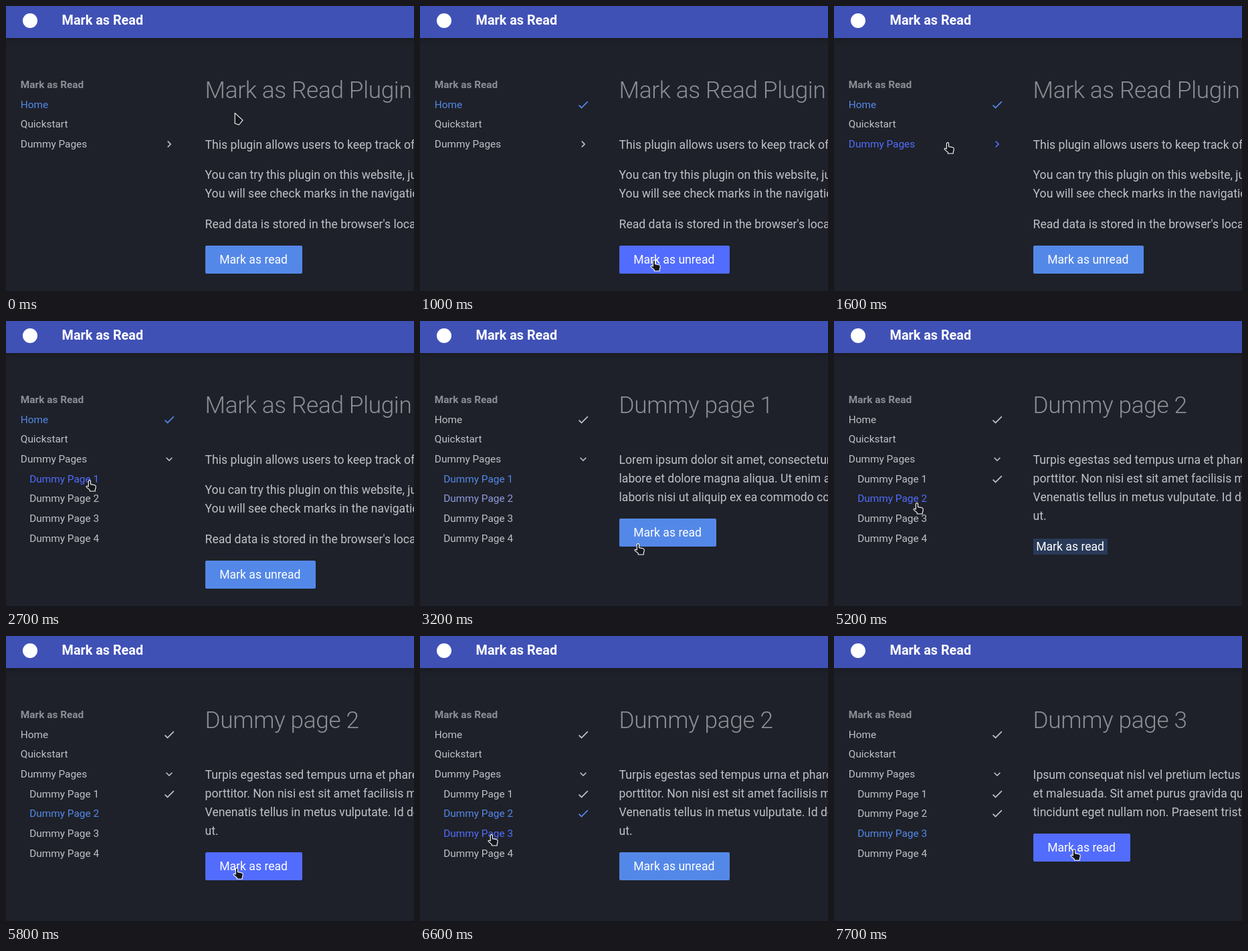
An HTML page that plays this animation: 610x430 px, repeating every 8 s.

```html
<!DOCTYPE html>
<html lang="en">
<head>
<meta charset="utf-8">
<title>Mark as Read</title>
<style>
html, body { margin: 0; width: 100%; height: 100%; overflow: hidden; background: #1e2129; }
#stage { position: relative; width: 610px; height: 430px; overflow: hidden; }
header { position: absolute; width: 610px; height: 48.4px; background: #4051b5;
  box-shadow: 0 0 4.4px #0000001a, 0 4.4px 8.8px #0003; }
svg { position: absolute; left: 0; top: 0; display: block; }
text { font-family: Roboto, "Liberation Sans", sans-serif; white-space: pre; }
.brand { font-size: 19.8px; font-weight: 700; fill: #fff; }
.nav { font-size: 15.4px; }
.title { font-weight: 700; fill: #8c8e95; }
.h1 { font-size: 35.2px; font-weight: 300; letter-spacing: -.01em; fill: #8c8e95; }
.body, .label { font-size: 17.6px; fill: #bfc1c6; }
.label { fill: #fff; }
.cursor path { fill: #15171c; stroke: #fff; stroke-width: 1.1; stroke-linejoin: round; }
</style>
</head>
<body>
<div id="stage">
<header></header>
<svg id="art" width="610" height="430" viewBox="0 0 610 430"></svg>
</div>
<script>
const LOOP = 8000, STEP = 100, FADE = 100;
const FG = [191, 193, 198], LINK = [84, 136, 232], ACCENT = [82, 108, 254];
const CONTENT_X = 297.6;

const pages = [
  { from: 0, row: 0, title: 'Mark as Read Plugin', button: 359, marked: 1000, lines: [
    [214, 'This plugin allows users to keep track of pages'],
    [259, 'You can try this plugin on this website, just'],
    [287, 'You will see check marks in the navigation'],
    [333, "Read data is stored in the browser's local storage"]] },
  { from: 3000, row: 3, title: 'Dummy page 1', button: 296, marked: 3800, lines: [
    [214, 'Lorem ipsum dolor sit amet, consectetur'],
    [242, 'labore et dolore magna aliqua. Ut enim ad'],
    [270, 'laboris nisi ut aliquip ex ea commodo consequat']] },
  { from: 5200, row: 4, title: 'Dummy page 2', button: 324, marked: 6000, plainUntil: 5300, lines: [
    [214, 'Turpis egestas sed tempus urna et pharetra'],
    [242, 'porttitor. Non nisi est sit amet facilisis magna'],
    [270, 'Venenatis tellus in metus vulputate. Id dolor'],
    [298, 'ut.']] },
  { from: 7000, row: 5, title: 'Dummy page 3', button: 296, marked: Infinity, lines: [
    [214, 'Ipsum consequat nisl vel pretium lectus'],
    [242, 'et malesuada. Sit amet purus gravida quis'],
    [270, 'tincidunt eget nullam non. Praesent tristique']] }
];

// Hover spans per navigation row: [enter, leave]
const rows = [
  { name: 'Home', y: 148, hover: [] },
  { name: 'Quickstart', y: 177, hover: [] },
  { name: 'Dummy Pages', y: 207, hover: [[1500, 2600]] },
  { name: 'Dummy Page 1', y: 237, hover: [[2400, 3050]] },
  { name: 'Dummy Page 2', y: 266, hover: [[3040, 3145], [4500, 5300]] },
  { name: 'Dummy Page 3', y: 296, hover: [[6500, 7150]] },
  { name: 'Dummy Page 4', y: 326, hover: [] }
];
const buttonHover = [[500, 1100], [3300, 3900], [5700, 6100], [7550, 9000]];

// Pointer stops: time, x, y
const stops = [
  [0, 342, 160], [100, 342, 160], [600, 350, 380], [1000, 350, 380], [1600, 170, 204],
  [2100, 170, 204], [2500, 125, 238], [3000, 125, 238], [3100, 210, 270], [3200, 326, 333],
  [3400, 334, 329], [3800, 334, 329], [4300, 115, 277], [4600, 116, 273], [4700, 124, 272],
  [5200, 124, 272], [5800, 345, 347], [6000, 345, 347], [6600, 107, 297], [7000, 107, 297],
  [7700, 359, 319], [LOOP, 359, 319]
];

const clamp = v => Math.max(0, Math.min(1, v));
const smooth = v => v * v * (3 - 2 * v);
const mix = (a, b, p) => a + (b - a) * p;
const tint = (a, b, p) => `rgb(${a.map((v, i) => Math.round(mix(v, b[i], p)))})`;
const hoverAt = (spans, t) => spans.reduce(
  (sum, [enter, leave]) => sum + clamp((t - enter) / FADE) - clamp((t - leave) / FADE), 0);

function add(parent, tag, attrs = {}, content = '') {
  const node = document.createElementNS('http://www.w3.org/2000/svg', tag);
  for (const key in attrs) node.setAttribute(key, attrs[key]);
  node.textContent = content;
  return parent.appendChild(node);
}
const set = (node, attrs) => { for (const key in attrs) node.setAttribute(key, attrs[key]); };
const show = (node, on) => set(node, { visibility: on ? 'visible' : 'hidden' });

const art = document.getElementById('art');
const text = (parent, x, y, cls, content) => add(parent, 'text', { x, y, class: cls }, content);

add(art, 'circle', { cx: 36, cy: 22, r: 11, fill: '#fff' });
text(art, 83.6, 28, 'brand', 'Mark as Read');
add(art, 'rect', { y: 427, width: 610, height: 3, fill: '#16171d' });
text(art, 21.8, 123, 'nav title', 'Mark as Read');

const subnav = add(art, 'g');
rows.forEach((row, i) => {
  const nested = i > 2, parent = nested ? subnav : art;
  row.label = text(parent, nested ? 35.2 : 21.8, row.y + 5, 'nav', row.name);
  const page = pages.find(p => p.row === i);
  row.marked = page ? page.marked : Infinity;
  row.check = add(parent, 'path', {
    d: 'M21 7 9 19l-5.5-5.5 1.41-1.41L9 16.17 19.59 5.59z',
    transform: `translate(234.1 ${row.y - 10}) scale(.825)`
  });
});
const chevron = add(art, 'path', { d: 'M-3.41 4.58 1.17 0-3.41-4.59-2-6l6 6-6 6z' });

for (const page of pages) {
  page.group = add(art, 'g');
  text(page.group, CONTENT_X, 138, 'h1', page.title);
  for (const [y, line] of page.lines) text(page.group, CONTENT_X, y, 'body', line);
}
const button = add(art, 'rect', { x: 298, rx: 2 });
const label = text(art, 0, 0, 'label', '');

const cursor = add(art, 'g', { class: 'cursor' });
const arrow = add(cursor, 'path', { d: 'M.2.4 12 11.2 6.3 18 .2 16z' });
const hand = add(cursor, 'path', {
  d: 'M-1.7 10V2.2a1.6 1.6 0 0 1 3.2 0V6.6l5.8 1.2q2 .5 2 2.4-.1 2.2-1 4.2V17H.3v-1.8L-4.8 10.8q-.6-1.6 1.2-1.6z'
});

function pointerAt(t) {
  const i = Math.max(1, stops.findIndex(s => s[0] >= t));
  const [t0, x0, y0] = stops[i - 1], [t1, x1, y1] = stops[i];
  const p = smooth(clamp((t - t0) / (t1 - t0)));
  return [mix(x0, x1, p), mix(y0, y1, p)];
}

function drawNav(t, page) {
  const opened = t < 2000 ? 0 : smooth(clamp((t - 1930) / 200));
  set(subnav, { opacity: opened, transform: `translate(0 ${-119 * (1 - opened)})` });
  rows.forEach((row, i) => {
    const color = tint(i === page.row ? LINK : FG, ACCENT, hoverAt(row.hover, t));
    set(row.label, { fill: color });
    set(row.check, { fill: color });
    show(row.check, t >= row.marked);
  });
  set(chevron, {
    fill: rows[2].label.getAttribute('fill'),
    transform: `translate(244 207) rotate(${90 * opened}) scale(.825)`
  });
}

function drawButton(t, page) {
  const marked = t >= page.marked, plain = t < page.plainUntil;
  label.textContent = marked ? 'Mark as unread' : 'Mark as read';
  if (plain) {
    set(button, { y: page.button + 2, width: 111, height: 24, rx: 0, fill: '#293a58' });
    set(label, { x: 302.2, y: page.button + 20 });
  } else {
    set(button, { y: page.button, width: marked ? 165 : 145, height: 42, rx: 2,
      fill: tint(LINK, ACCENT, hoverAt(buttonHover, t)) });
    set(label, { x: 319.2, y: page.button + 27 });
  }
  return marked ? 463 : 443;
}

function drawCursor(t, page, buttonRight) {
  const [x, y] = pointerAt(t).map(Math.round);
  const onRow = x < 252 && rows.some((r, i) => (i < 3 || t >= 2000) && Math.abs(y - r.y) < 6.5);
  const onButton = x >= 298 && x < buttonRight && y >= page.button && y < page.button + 42;
  set(cursor, { transform: `translate(${x} ${y})` });
  show(hand, onRow || onButton);
  show(arrow, !(onRow || onButton));
}

function draw(time) {
  const t = Math.floor((time % LOOP) / STEP) * STEP;
  const page = pages.filter(p => p.from <= t).pop();
  for (const p of pages) show(p.group, p === page);
  drawNav(t, page);
  drawCursor(t, page, drawButton(t, page));
}

const start = performance.now();
function tick() {
  draw(performance.now() - start);
  requestAnimationFrame(tick);
}
tick();
</script>
</body>
</html>
```
